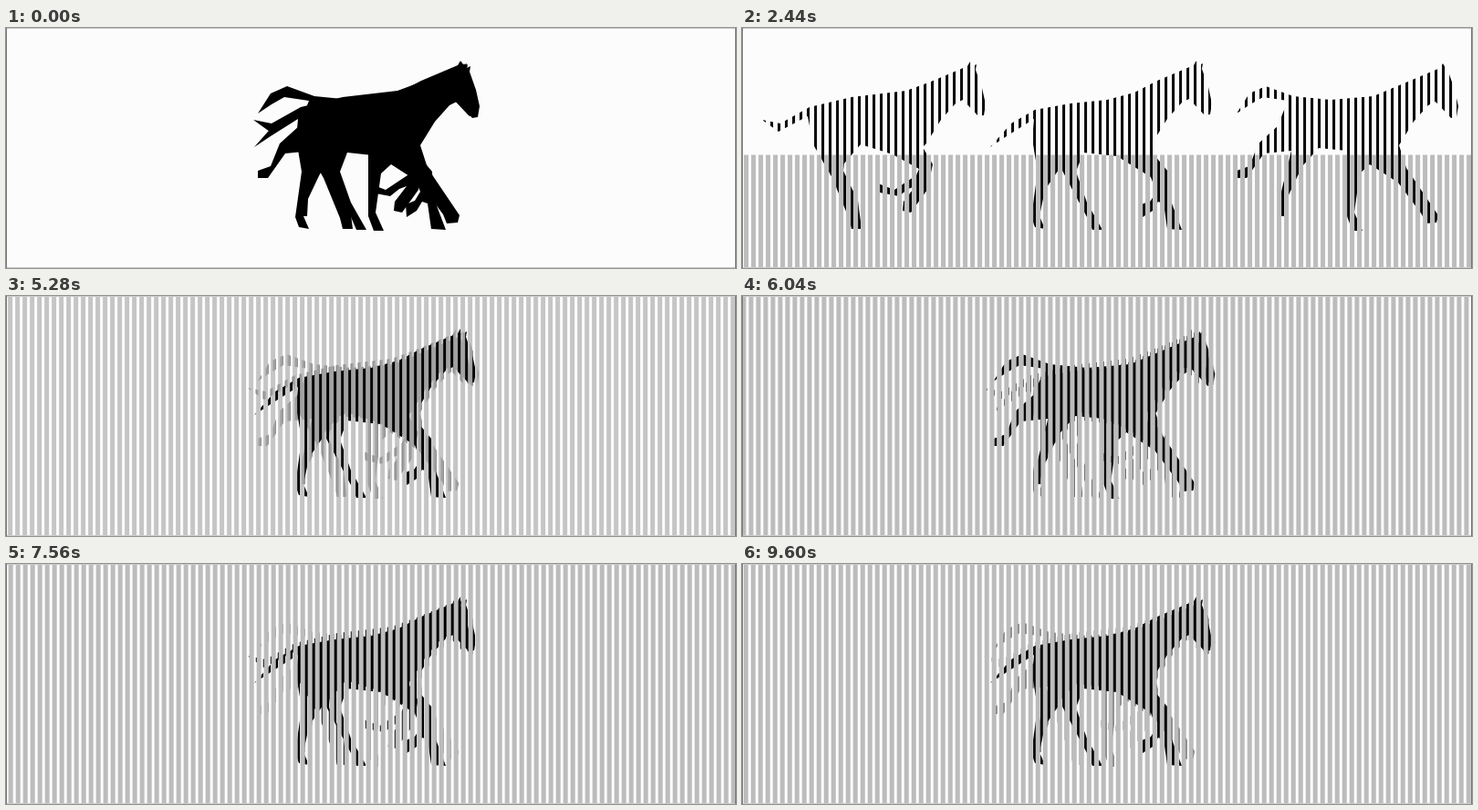
Recreate the animation shown at these times as an HTML page with a canvas. Size 800x264 px, loop 9640 ms.

```html
<!DOCTYPE html>
<html lang="en">
<head>
<meta charset="utf-8">
<title>Striped horses</title>
<style>
html, body { margin: 0; width: 100%; height: 100%; overflow: hidden; background: #fcfcfc; }
canvas { display: block; }
</style>
</head>
<body>
<canvas id="stage" width="800" height="264"></canvas>
<script>
const W = 800, H = 264, LOOP = 9640, STEP = 40;
const PITCH = 8, SLIT = 3, SLIT_X = -0.9, GRATE_H = 289;
const ctx = document.getElementById('stage').getContext('2d');

const progress = (t, from, to) => Math.min(1, Math.max(0, (t - from) / (to - from)));

// All horses share one head and neck, moved to each body.
const head = new Path2D('M455 58 495 41 498 36 501 41 505 39 504 45 511 65 515 83 513 95 507 96 490 78 482 82 466 100 450 126Z');

function horse(body, headX, headY) {
  const shape = new Path2D(body);
  shape.addPath(head, new DOMMatrix().translate(headX, headY));
  return shape;
}

const gallop = horse('M22 101 42 105 74 87 120 76 180 69 207 59 202 127 198 131 209 150 203 178 185 203 176 201 177 191 190 174 182 177 172 185 151 181 149 171 167 178 191 162 194 155 165 139 130 128 112 149 111 157 127 190 131 221 120 221 117 209 99 165 78 128 72 97 40 114Z', -248, 1);

const trot = horse('M272 131 295 105 321 90 360 83 400 79 430 71 455 58 450 126 452 140 467 158 468 185 482 222 466 221 462 193 456 191 450 201 439 208 438 194 448 190 454 180 448 164 411 141 374 137 366 158 378 192 395 222 384 222 378 208 349 153 332 178 326 207 332 221 321 219 317 208 324 158 318 122 320 100 290 119Z', 0, 0);

const stride = horse('M542 94 556 72 574 64 604 75 645 79 692 75 725 61 720 129 728 154 763 206 761 214 749 215 745 205 719 170 688 150 677 160 671 203 680 223 669 223 663 207 663 135 632 132 614 152 597 188 596 207 590 207 590 184 602 135 572 138 553 165 542 165 542 157 556 152 566 127 587 108 598 80 571 76 557 84Z', 270, 3);

// home: shift to the shared centre; slot: shift that interleaves the slices.
const horses = [
  { shape: gallop, home: 249, slot: 30 * PITCH + PITCH / 3, apart: 1160 },
  { shape: trot, home: 0, slot: 0, apart: 1160 },
  { shape: stride, home: -266, slot: -33 * PITCH - PITCH / 3, apart: 1080 }
];

function drawHorses(t, cut) {
  const slices = new Path2D();
  slices.rect(0, cut, W, H - cut);
  if (cut > 0)
    for (let x = SLIT_X; x < W; x += PITCH) slices.rect(x, 0, SLIT, cut);
  ctx.fillStyle = '#000';
  for (const h of horses) {
    const dx = t < 2000
      ? h.home * (1 - progress(t, 40, h.apart))
      : h.slot * progress(t, 2920, 3880);
    ctx.save();
    ctx.translate(dx, 0);
    ctx.clip(slices);
    ctx.fill(h.shape);
    ctx.restore();
  }
}

function drawGrating(shift, top, alpha) {
  ctx.globalAlpha = alpha;
  ctx.fillStyle = '#bcbcbc';
  const start = SLIT_X + SLIT + shift % PITCH - 2 * PITCH;
  for (let x = start; x < W; x += PITCH)
    ctx.fillRect(x, top, PITCH - SLIT, GRATE_H);
  ctx.globalAlpha = 1;
}

function drawBorder() {
  ctx.fillStyle = '#ccc';
  ctx.fillRect(0, 0, W, 1);
  ctx.fillRect(0, H - 1, W, 1);
  ctx.fillStyle = '#777';
  ctx.fillRect(0, 0, 1, H);
  ctx.fillRect(W - 1, 0, 1, H);
}

function frame(now) {
  const t = Math.floor(now % LOOP / STEP) * STEP;
  const sweep = Math.max(0, t - 1480) * 0.4464;
  ctx.fillStyle = '#fcfcfc';
  ctx.fillRect(0, 0, W, H);
  drawHorses(t, Math.min(H, sweep));
  if (t < 2760) drawGrating(0, sweep - GRATE_H, 1);
  else drawGrating(Math.max(0, t - 5320) * 0.0074, 0, progress(t, 4360, 5440));
  drawBorder();
}

const begin = performance.now();
function tick() {
  frame(performance.now() - begin);
  requestAnimationFrame(tick);
}
tick();
</script>
</body>
</html>
```
